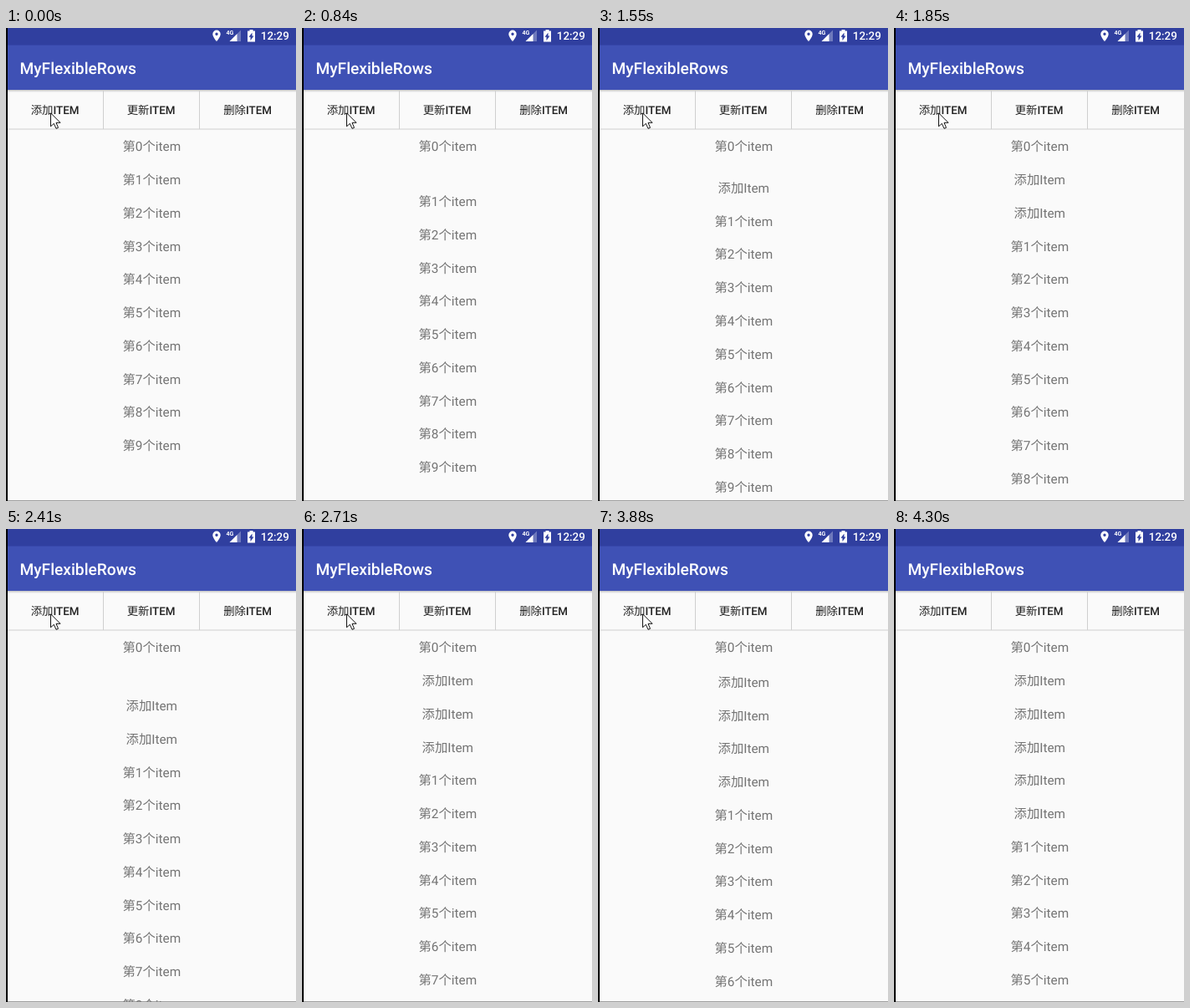
Recreate the animation shown at these times as an HTML page. Size 347 by 566 pixels, loop 4.98 s.

```html
<!DOCTYPE html>
<html lang="zh">
<head>
<meta charset="utf-8">
<title>List insertion</title>
<style>
  html, body { margin: 0; width: 100%; height: 100%; overflow: hidden; background: #fafafa; }
  svg { display: block; width: 347px; height: 566px; }
  text {
    font-family: Roboto, "Noto Sans CJK SC", "Noto Sans CJK", sans-serif;
    text-rendering: geometricPrecision;
  }
  .title { font-size: 19.17px; font-weight: 500; fill: #fff; }
  .clock { font-size: 13.42px; font-weight: 500; fill: #fff; }
  .button { font-size: 13.42px; fill: #222; text-anchor: middle; }
  .button tspan { font-weight: 500; }
  .row { font-size: 15.33px; fill: #747474; text-anchor: middle; }
</style>
</head>
<body>
<svg viewBox="0 0 347 566">
  <defs>
    <linearGradient id="shade" x2="0" y2="1">
      <stop stop-color="#000" stop-opacity=".22"/>
      <stop offset="1" stop-color="#000" stop-opacity="0"/>
    </linearGradient>
  </defs>
  <rect width="347" height="566" fill="#fafafa"/>

  <!-- app bar -->
  <rect y="74" width="347" height="3" fill="url(#shade)"/>
  <rect width="347" height="74" fill="#3f51b5"/>
  <rect width="347" height="20.5" fill="#303f9f"/>
  <text class="title" x="16.5" y="55">MyFlexibleRows</text>

  <!-- status icons -->
  <g fill="#fff">
    <path fill-rule="evenodd" d="M252 2.5a4.7 4.7 0 0 1 4.7 4.7C256.7 10.7 252 16 252 16S247.3 10.7 247.3 7.2A4.7 4.7 0 0 1 252 2.5zm0 3a1.7 1.7 0 1 0 0 3.4a1.7 1.7 0 1 0 0-3.4z"/>
    <path d="M281 2.5V16H267.5z" opacity=".3"/>
    <path d="M276.5 7V16H267.5z"/>
    <text x="263.5" y="8.3" font-size="7" font-weight="700">4G</text>
    <path d="M291.5 2h4v1.5h2.500v13h-9v-13h2.500z"/>
    <path d="M294.5 5.5v4h2l-4 5.500v-4.300h-2z" fill="#303f9f"/>
  </g>
  <text class="clock" x="304.8" y="14.3">12:29</text>

  <!-- button bar -->
  <path d="M116.5 75V121M231.5 75V121M2 121H347" stroke="#cfcfcf" fill="none"/>
  <text class="button" x="58.6" y="102.5">添加<tspan>ITEM</tspan></text>
  <text class="button" x="173.6" y="102.5">更新<tspan>ITEM</tspan></text>
  <text class="button" x="289.1" y="102.5">删除<tspan>ITEM</tspan></text>

  <path d="M0 565.5H347" stroke="#a0a0a0"/>
  <g id="list"></g>
  <rect width="2" height="566" fill="#000"/>
  <path id="cursor" transform="translate(53.5 101.8)" d="M0 0V16L3.8 12.5L6.5 18.5L9 17.5L6.5 11.5H11.5z" fill="#fff" stroke="#111"/>
</svg>
<script>
const LOOP = 4980, PITCH = 39.77, FIRST_BASELINE = 147.3, CENTER = 174.3;
const MOVE_MS = 250, FADE_MS = 120, CURSOR_GONE = 4150;
const inserts = [690, 1467, 2243, 3020, 3846];
// The screen refreshes only at these moments.
const refreshes = [0, 840, 990, 1120, 1550, 1700, 1850, 2410, 2560, 2710,
  3170, 3320, 3470, 3880, 4030, 4150, 4300];

const list = document.getElementById("list");
const cursor = document.getElementById("cursor");

function addRow(label) {
  const row = document.createElementNS("http://www.w3.org/2000/svg", "text");
  row.setAttribute("class", "row");
  row.setAttribute("x", CENTER);
  row.textContent = label;
  return list.appendChild(row);
}

const items = Array.from({ length: 10 }, (_, i) => addRow(`第${i}个item`));
const added = inserts.map(() => addRow("添加Item"));

const ease = (elapsed, duration) =>
  (1 - Math.cos(Math.PI * Math.min(1, Math.max(0, elapsed / duration)))) / 2;
const place = (row, slot) => row.setAttribute("y", FIRST_BASELINE + slot * PITCH);

function draw(time) {
  const t = refreshes.findLast(moment => moment <= time);
  let shift = 0;
  // Newest first: each row is pushed down by every later insertion.
  for (let k = inserts.length - 1; k >= 0; k--) {
    const elapsed = t - inserts[k];
    place(added[k], 1 + shift);
    added[k].setAttribute("opacity", ease(elapsed - MOVE_MS, FADE_MS));
    shift += ease(elapsed, MOVE_MS);
  }
  items.forEach((row, i) => place(row, i ? i + shift : 0));
  cursor.setAttribute("visibility", t < CURSOR_GONE ? "visible" : "hidden");
}

const start = performance.now();
function tick() {
  draw((performance.now() - start) % LOOP);
  requestAnimationFrame(tick);
}
tick();
</script>
</body>
</html>
```
